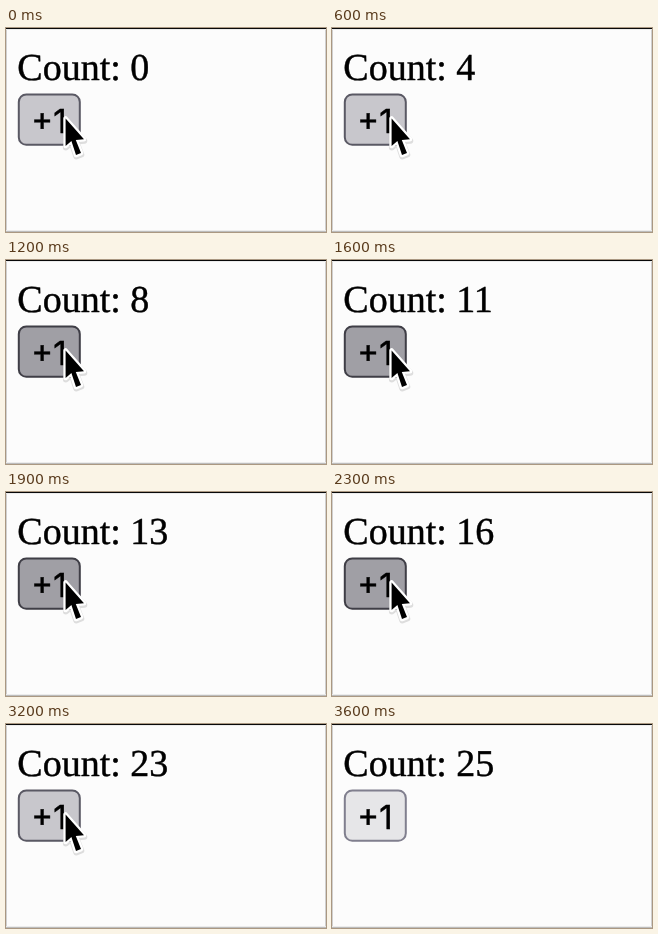
Recreate the animation shown at these times as an HTML page. Size 320x204 px, loop 4.6 s.

```html
<!DOCTYPE html>
<html lang="en">
<head>
<meta charset="utf-8">
<title>Counter</title>
<style>
  html, body { margin: 0; width: 100%; height: 100%; overflow: hidden; background: #fcfcfc; }
  svg { display: block; width: 100%; height: 100%; }
  text { stroke: #000; stroke-width: .45; text-rendering: geometricPrecision; }
  #count { font: 38px "Liberation Serif", serif; white-space: pre; }
  #label { font: 33px Inter, sans-serif; text-anchor: middle; }
</style>
</head>
<body>
<svg viewBox="0 0 320 204">
  <rect width="320" height="204" fill="#fcfcfc"/>
  <path d="M.5 0V204M319.5 0V204" stroke="#d0d0d0"/>
  <path d="M0 202.5H320" stroke="#ececec"/>
  <path d="M0 203.5H320" stroke="#bcbcbc"/>
  <path d="M0 1.5H320" stroke="#ececec"/>
  <path d="M0 .5H320" stroke="#080808"/>
  <text id="count" x="11.3" y="52.4">Count: 0</text>
  <rect id="button" x="12.8" y="66.4" width="61" height="50.4" rx="7.5" stroke-width="2"/>
  <text id="label" x="43" y="104.6">+1</text>
  <g id="cursor" stroke-linejoin="round">
    <path d="M59.6 90.5V118L65.4 113 70 127 75 125 69.8 112 78 111.3Z"
      transform="translate(.3 1.5)" fill="none" stroke="#000" stroke-opacity=".12" stroke-width="6"/>
    <path d="M59.6 90.5V118L65.4 113 70 127 75 125 69.8 112 78 111.3Z"
      fill="#000" stroke="#fff" stroke-width="4.6" paint-order="stroke"/>
  </g>
</svg>
<script>
  const LOOP = 4600, STEP = 100, START = 200, END = 3600;
  const CLICK = 136.8, OFFSET = 25.4, TOTAL = 25;
  const styles = {
    idle: ["#e6e6e8", "#807f8e"],
    hover: ["#c8c7cc", "#5a5964"],
    active: ["#a09fa5", "#3f3e46"]
  };
  const [count, button, cursor] = ["count", "button", "cursor"].map(id => document.getElementById(id));

  // Clicks come at a steady rate; the count rises on release.
  function stateAt(t) {
    if (t < START) return { n: 0, mode: "hover" };
    if (t >= END) return { n: TOTAL, mode: "idle" };
    const clicks = Math.min(TOTAL, (Math.floor(t / STEP) * STEP - OFFSET) / CLICK);
    const n = Math.floor(clicks);
    return { n, mode: clicks - n > 0.4 ? "active" : "hover" };
  }

  function draw(t) {
    const { n, mode } = stateAt(t);
    const [fill, stroke] = styles[mode];
    count.textContent = `Count: ${n}`;
    button.setAttribute("fill", fill);
    button.setAttribute("stroke", stroke);
    cursor.setAttribute("visibility", mode === "idle" ? "hidden" : "visible");
  }

  const t0 = performance.now();
  function tick() {
    draw((performance.now() - t0) % LOOP);
    requestAnimationFrame(tick);
  }
  tick();
</script>
</body>
</html>
```
